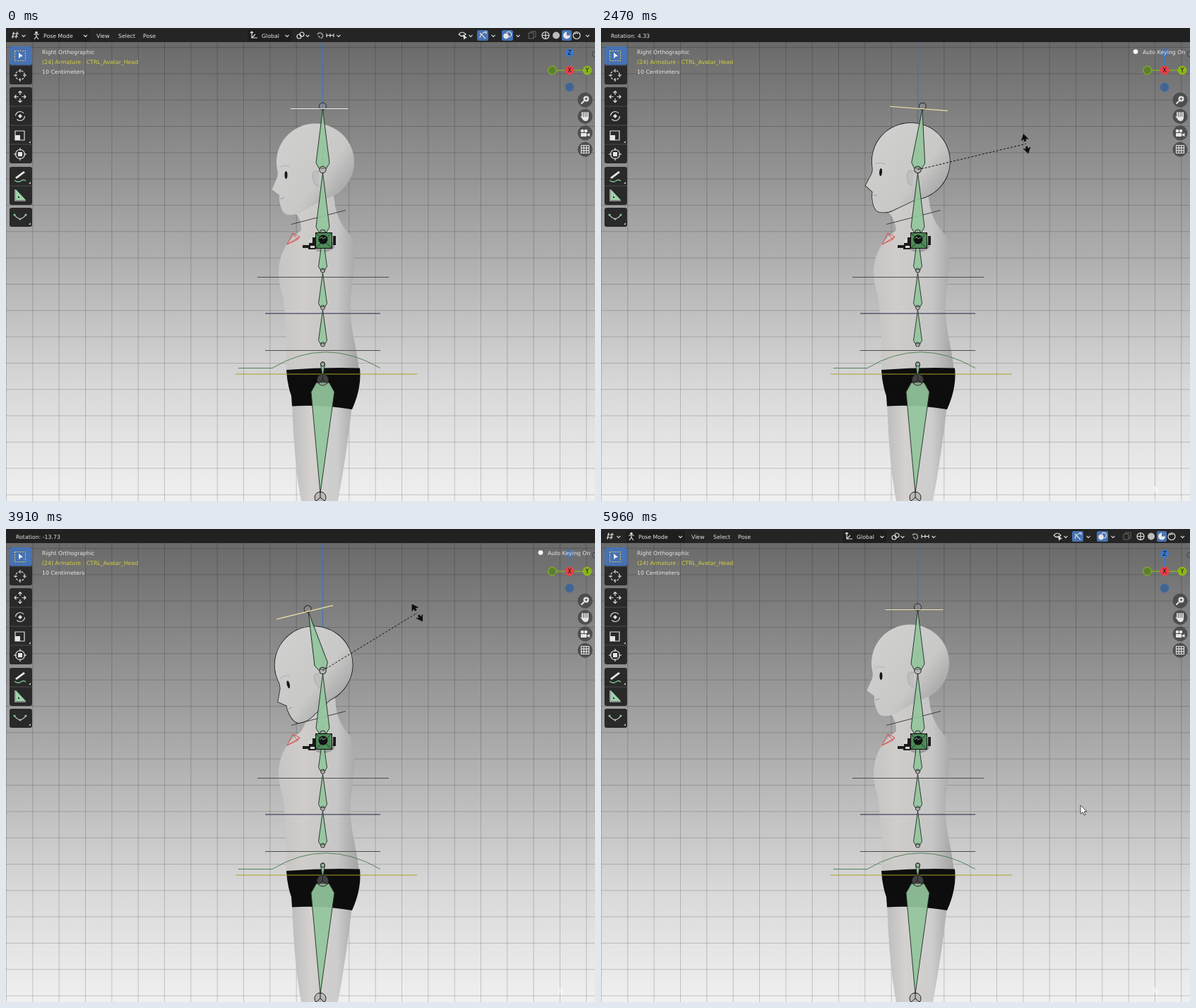
An HTML page that plays this animation: 834 px wide and 671 px high, repeating every 5.99 s.

```html
<!DOCTYPE html>
<html lang="en">
<head>
<meta charset="utf-8">
<title>Head bone rotation</title>
<style>
html, body { margin: 0; width: 100%; height: 100%; overflow: hidden; background: #999; }
svg { display: block; width: 834px; height: 671px; }
text { font: 7.8px "DejaVu Sans", Verdana, sans-serif; fill: #e6e6e6; white-space: pre; }
.axis { font-size: 8px; text-anchor: middle; fill: #111; }
.ico { fill: none; stroke: #dedede; stroke-width: 1.2; }
.lit { fill: #e6e6e6; }
.on { fill: #4772b3; }
.bone { fill: #93c69d; fill-opacity: .92; stroke: #1f2b22; stroke-width: .9; stroke-linejoin: round; }
.joint { fill: rgba(150,150,150,.4); stroke: #262626; stroke-width: 1; }
.line { fill: none; }
</style>
</head>
<body>
<svg viewBox="0 0 834 671">
<defs>
  <linearGradient id="sky" x1="0" y1="20" x2="0" y2="671" gradientUnits="userSpaceOnUse">
    <stop offset="0" stop-color="#6a6a6a"/><stop offset=".5" stop-color="#b3b3b3"/>
    <stop offset=".75" stop-color="#d8d8d8"/><stop offset="1" stop-color="#f0f0f0"/>
  </linearGradient>
  <linearGradient id="skin" x1="385" x2="497" y1="0" y2="0" gradientUnits="userSpaceOnUse">
    <stop offset="0" stop-color="#c6c5c4"/><stop offset=".3" stop-color="#cfccc9"/>
    <stop offset=".75" stop-color="#c6c6c6"/><stop offset="1" stop-color="#a6a6a6"/>
  </linearGradient>
  <linearGradient id="face" x1="395" y1="160" x2="492" y2="232" gradientUnits="userSpaceOnUse">
    <stop offset="0" stop-color="#cfcfce"/><stop offset=".6" stop-color="#c8c8c7"/>
    <stop offset="1" stop-color="#a0a0a0"/>
  </linearGradient>
  <linearGradient id="leg" x1="405" x2="490" y1="0" y2="0" gradientUnits="userSpaceOnUse">
    <stop offset="0" stop-color="#bdbdbd"/><stop offset=".3" stop-color="#d4d1cf"/>
    <stop offset=".75" stop-color="#cdcdcd"/><stop offset="1" stop-color="#aeaeae"/>
  </linearGradient>
  <path id="pointer" d="M0 0V12.3L3 9.6 5 14 7 13.1 5.1 8.8H9Z"/>
  <path id="chev" d="M-2.5-1.2 0 1.3 2.5-1.2" class="ico"/>
  <path id="tip" d="M0-14 5-6 1.2-7.500V-4H-1.2V-7.500L-5-6Z"/>
  <g id="skull">
    <ellipse cx="438" cy="190" rx="55" ry="54.500"/>
    <path d="M383 188Q386 206 384 212L376.500 229 387 237 387 244Q390 264 399 265 410 266 418 261L455 240Z"/>
  </g>
</defs>
<rect width="834" height="671" fill="url(#sky)"/>
<path id="grid" class="line" stroke="#000" stroke-opacity=".19"/>
<path d="M448.500 20V140" stroke="#3f74b8" stroke-width="1.200"/>

<path d="M405 530Q408 620 418 671H470Q483 600 490 535Z" fill="url(#leg)"/>
<path id="body" fill="url(#skin)"/>
<path d="M397 485Q450 481 501 482.500 504 510 490 541 447 534 405 536.500L404 522Q398 505 397 485Z" fill="#0d0d0d"/>
<path d="M432 309Q446 326 465 312V304H432Z" fill="#9d9d9d"/>

<g id="head">
  <use id="rim" href="#skull" stroke="#1b1b1b" stroke-width="1.500"/>
  <use href="#skull" fill="url(#face)"/>
  <path d="M443 204Q434 200 434 210 435 225 443 224" fill="#bebebe" stroke="#aaa"/>
  <path d="M387 198Q394 193 402 197" class="line" stroke="#b2b0ae"/>
  <ellipse cx="396.500" cy="208.500" rx="2" ry="5.500" fill="#181818"/>
  <path d="M388 242.500 394 241" stroke="#999"/>
</g>

<path d="M404 278.500 481 258.500" stroke="#333" stroke-width=".9"/>
<path d="M356 353.500H542M367 457.500H530" stroke="#4d4d4d"/>
<path d="M367 405H530" stroke="#25254f" stroke-width="1.100"/>
<path d="M329 482.500H377Q452 437 530 482.500" class="line" stroke="#437a4c" stroke-width=".9"/>
<path d="M325 491H582" stroke="#a7a32a" stroke-width="1.200"/>
<path d="M398 307 406 291 416 296 413 300ZL416 296M406 291 413 300" class="line" stroke="#d84a4a" stroke-width=".9"/>

<g id="bones"></g>
<path d="M420 308h9v-3h5v-8h4v17h-10v-2h-8ZM463 295h4v13h-4z" fill="#1b1b1b"/>
<path d="M428 300h5v5h-5zM431 309h6v3h-6z" fill="#d5d5d5"/>
<rect x="438.500" y="290.500" width="23" height="22" fill="#4e8a59" stroke="#111"/>
<path d="M439 291 461 312M461 291 439 312" stroke="#1d3b24"/>
<circle cx="449" cy="300" r="6.500" fill="#111"/>
<path d="M444 299l3-3 2 3 4-2" class="line" stroke="#79b487"/>
<path d="M448.500 171V196" stroke="#222" stroke-dasharray="2.500 2"/>
<g id="tipBone"></g>

<g id="drag">
  <path id="tether" stroke="#111" stroke-dasharray="3 2.200"/>
  <g id="arrows" fill="#0c0c0c" stroke="#0c0c0c" stroke-width=".6">
    <use href="#tip"/><use href="#tip" transform="rotate(180)"/>
  </g>
</g>

<g id="tools"></g>
<text x="51" y="36.500">Right Orthographic</text>
<text x="51" y="50.500" style="fill:#d6d03a">(24) Armature : CTRL_Avatar_Head</text>
<text x="51" y="64.500">10 Centimeters</text>

<path d="M779 60H817" stroke="#7fae1c" stroke-width="1.600"/>
<path d="M798 40V60" stroke="#3b78cc" stroke-width="1.600"/>
<circle cx="773.500" cy="60" r="5.800" fill="#5c7f33" stroke="#7fb01d" stroke-width="1.300"/>
<circle cx="798" cy="84" r="6" fill="#42658f" stroke="#3d6fb0"/>
<circle id="zBall" cx="798" cy="35" r="6" fill="#3b78cc"/>
<circle cx="798" cy="60" r="6.500" fill="#e8404a"/>
<circle cx="823" cy="60" r="6.500" fill="#8cb61c"/>
<text class="axis" x="798" y="63">X</text><text class="axis" x="823" y="63">Y</text>
<text class="axis" id="zText" x="798" y="38">Z</text>
<path d="M834 33a4 4 0 0 0 0 8" class="line" stroke="#444"/>
<g id="nav"></g>

<g id="menu">
  <rect width="834" height="20" fill="#252525"/>
  <rect x="35" y="2" width="84" height="17" rx="3" fill="#1e1e1e"/>
  <rect x="342" y="2" width="62" height="17" rx="3" fill="#1e1e1e"/>
  <rect x="667" y="3" width="16" height="15" rx="2.500" class="on"/>
  <rect x="702" y="3" width="16" height="15" rx="2.500" class="on"/>
  <rect x="787" y="3" width="14" height="15" rx="2" class="on"/>
  <text x="53" y="13.500">Pose Mode</text><text x="128" y="13.500">View</text>
  <text x="159" y="13.500">Select</text><text x="194" y="13.500">Pose</text>
  <text x="362" y="13.500">Global</text>
  <g id="chevs"></g>
  <path class="ico" d="M9 8h9M8 12h9M11 5.500l-2 9M16 5.500l-2 9"/>
  <path class="ico" d="M43 9v3l-3 4M43 12l3 4M39 9h8"/><circle cx="43" cy="6.500" r="1.800" class="lit"/>
  <path class="ico" d="M346 7l2-2 2 2M348 5v9h8M348 14l5-5"/>
  <circle class="ico" cx="415" cy="12" r="3"/><circle class="ico" cx="419" cy="9" r="3"/>
  <path d="M441 9a4 4 0 1 1 7 4l-2 2M442 11l3 3" class="line" stroke="#999" stroke-width="1.600"/>
  <path class="ico" d="M454 8v5M459 8v5M464 8v5M454 10.500h10"/>
  <path class="ico" d="M641 9q5-6 10 0-5 5-10 0"/><path d="M647 9l6 5-3 .5-1.500 2.500Z" class="lit"/>
  <path class="ico" d="M671 14q1-7 8-8M671 7l8 8M677 5.500h3v3"/>
  <circle cx="708" cy="11.500" r="3.700" class="lit"/><circle class="ico" cx="712" cy="9" r="3.700"/>
  <path d="M740 7h7v8h-7zM743 7v-2h7v8h-3" class="line" stroke="#666"/>
  <circle class="ico" cx="764" cy="10.500" r="5"/><path class="ico" d="M759 10.500h10M764 5.500v10"/>
  <circle cx="779" cy="10.500" r="5" fill="#bdbdbd"/>
  <circle cx="794" cy="10.500" r="5" class="lit"/><path d="M794 10.500V5.500a5 5 0 0 1 5 5Z" class="on"/>
  <circle class="ico" cx="808" cy="10.500" r="5"/><path class="ico" d="M805 9q2-3 5-1"/>
</g>
<g id="status">
  <rect width="834" height="20" fill="#212121"/>
  <text id="readout" x="14" y="13.500"></text>
  <circle cx="757" cy="33.500" r="3.300" fill="#fff"/>
  <text x="767" y="36.500">Auto Keying On</text>
</g>
<use id="residue" href="#pointer" x="782" y="648" fill="#fff" opacity=".45"/>
<circle id="click" cx="478.500" cy="114" r="9.500" fill="#d3c91c"/>
<use id="mouse" href="#pointer" fill="#fff" stroke="#222" stroke-width=".8"/>
</svg>
<script>
const LOOP = 5990, PX = 448.5, PY = 201, CELL = 37.33, RAD = Math.PI / 180;
const $ = id => document.getElementById(id);
const set = (id, name, value) => $(id).setAttribute(name, value);
const show = (id, on) => { $(id).style.display = on ? '' : 'none'; };

// Move a point part of the way along with the head
function follow(x, y, weight, deg) {
  const c = Math.cos(deg * RAD), s = Math.sin(deg * RAD), dx = x - PX, dy = y - PY;
  return [x + weight * (dx * c - dy * s - dx), y + weight * (dx * s + dy * c - dy)];
}

const torso = deg => `M${follow(432, 235, 1, deg)}L${follow(410, 263, 1, deg)}
  Q${follow(418, 270, .45, deg)} 418 287C385 310 380 345 392 380Q399 430 397 488H500
  C497 445 482 420 490 365C495 335 494 300 486 292Q467 272 ${follow(465, 244, .15, deg)}
  L${follow(462, 226, .6, deg)}Z`;

const joint = (y, r, x = PX) => `<circle class="joint" cx="${x}" cy="${y}" r="${r}"/>`;

// Kite from tip to base, widest just before the base
function bone(tip, base, half, tipX = PX) {
  const dir = Math.sign(base - tip), wide = base - dir * half * .8;
  return `<path class="bone" d="M${tipX} ${tip}L${PX + half} ${wide} ${PX + half * .55} ${base}
    H${PX - half * .55}L${PX - half} ${wide}Z"/>`;
}

function tools() {
  const groups = [[26, 2], [84, 4], [197, 2], [255, 1]];
  let out = '';
  for (const [y, n] of groups) {
    out += `<rect x="5" y="${y}" width="32" height="${n * 27}" rx="3" fill="#292929"/>`;
    for (let i = 1; i < n; i++) out += `<path d="M5 ${y + i * 27}H37" stroke="#555" stroke-width=".8"/>`;
  }
  const spokes = (y, from, to, head) => [0, 90, 180, 270].map(a =>
    `<path class="ico" transform="rotate(${a} 20 ${y})" d="M20 ${y - from}V${y - to}${head ? 'm-2.500 2.500l2.500-2.500 2.500 2.500' : ''}"/>`).join('');
  const ring = (y, dash = '') => `<circle class="ico" cx="20" cy="${y}" r="6.500" stroke-dasharray="${dash}"/>`;
  return out + `<rect x="5" y="26" width="32" height="26.500" rx="3" class="on"/>
    <rect x="12.500" y="32.500" width="15" height="14" class="line" stroke="#e6c766" stroke-dasharray="2 1.500"/>
    <path d="M18 35l6 5-3.500.5-2 3Z" fill="#fff"/>`
    + ring(67, '3 1.500') + spokes(67, 9, 4) + spokes(97.5, 2.5, 8, true)
    + ring(125, '15 5.400') + `<path d="M20 122l3 3-3 3-3-3z" class="lit"/>`
    + `<path class="ico" d="M13 146h13v13h-13z"/><path d="M13 152h7v7h-7z" class="lit"/>`
    + ring(179) + spokes(179, 9, 5) + `<path d="M17 176h6v6h-6z" class="lit"/>`
    + `<path d="M13 212l12-9 2 2-12 9z" class="lit"/><path d="M12 216q5 4 9 1t7 0" class="line" stroke="#7fc796" stroke-width="1.300"/>
    <path d="M14 229v15h14zM17 238v3h3z" fill="#9fd3ad" fill-rule="evenodd"/><path class="ico" d="M13 229v16h15"/>
    <path class="ico" d="M12 265q8 11 16 0"/><g fill="#8ccb9b"><circle cx="12" cy="265" r="1.500"/><circle cx="28" cy="265" r="1.500"/><circle cx="20" cy="271" r="1.500"/></g>`
    + [163, 221, 279].map(y => `<path d="M35 ${y - 3}v3h-3z" fill="#bbb"/>`).join('');
}

function nav() {
  let out = '';
  for (let i = 0; i < 4; i++) out += `<circle cx="820" cy="${102 + i * 23.4}" r="10.500" fill="#454545" fill-opacity=".85"/>`;
  for (let i = 0; i < 4; i++) out += `<path d="M${816 + i * 2.7} 127v-7" stroke="#e6e6e6" stroke-width="1.800" stroke-linecap="round"/>`;
  return out + `<circle cx="821.500" cy="100.500" r="4" class="lit"/><path d="M818.500 103.500l-4 4" stroke="#e6e6e6" stroke-width="2"/>
    <path d="M819.500 100.500h4M821.500 98.500v4" stroke="#444"/>
    <path d="M813 125l3 1h9q0 6-4.500 6-3 0-5-4z" class="lit"/>
    <path d="M814 149h8v5h-8zM822.500 151l4-2v5l-4-2z" class="lit"/><circle cx="816" cy="146" r="2.300" class="lit"/><circle cx="821" cy="146" r="2.300" class="lit"/>
    <path class="ico" d="M814.500 166.500h11v11h-11zM818.200 166.500v11M821.800 166.500v11M814.500 170.200h11M814.500 173.800h11"/>`;
}

function build() {
  let grid = '', spine = bone(205, 290, 9.5) + joint(290, 4);
  for (let x = PX - CELL * 12; x < 834; x += CELL) grid += `M${x} 20V671`;
  for (let y = 27.5; y < 671; y += CELL) grid += `M0 ${y}H834`;
  for (let y = 344; y < 460; y += 52.5) spine += bone(y - 49, y - 1, 6) + joint(y, 3);
  set('grid', 'd', grid);
  $('bones').innerHTML = spine + bone(497, 474, 3) + joint(477, 3) + bone(660, 503, 16.5, 445)
    + joint(499, 8) + joint(666, 8, 445)
    + `<path d="M448.500 491v8l-6 5M448.500 499l6 5M445 658v8l-6 5M445 666l6 5" class="line" stroke="#1c1c1c"/>`;
  $('tipBone').innerHTML = bone(115, 199, 9.5) + joint(111, 5) + joint(PY, 4.8)
    + `<path id="ctrl" d="M402.500 114.500H484.500" stroke-width="1.200"/>`;
  $('tools').innerHTML = tools();
  $('nav').innerHTML = nav();
  $('chevs').innerHTML = [25, 112.5, 398, 427, 471, 658, 690, 725, 823.5]
    .map(x => `<use href="#chev" x="${x}" y="11"/>`).join('');
}

// Each row is a time and its values; rows are joined by a cosine ease
const arrive = [[120, 782, 648], [690, 477, 100], [910, 478.5, 113.5], [1810, 478.5, 113.5], [2410, 589, 156]];
const leave = [[5530, 622, 190], [5930, 679, 392]];
const swing = [[2440, 0], [2470, 4.33], [3270, 43.7], [3910, -13.73], [4900, 48.77], [5400, 12]];

function sample(keys, t) {
  const i = keys.findIndex(k => k[0] > t);
  if (i < 1) return keys.at(i).slice(1);
  const a = keys[i - 1], b = keys[i];
  const u = (1 - Math.cos(Math.PI * (t - a[0]) / (b[0] - a[0]))) / 2;
  return a.slice(1).map((v, k) => v + (b[k + 1] - v) * u);
}

function drawDrag(deg) {
  const aim = deg - 17.8, dist = 157 + .021 * Math.max(0, deg) ** 2;
  const x = PX + dist * Math.cos(aim * RAD), y = PY + dist * Math.sin(aim * RAD);
  set('tether', 'd', `M${PX} ${PY}L${x} ${y}`);
  set('arrows', 'transform', `translate(${x} ${y}) rotate(${aim})`);
  $('readout').textContent = 'Rotation: ' + deg.toFixed(2);
}

function draw() {
  const t = performance.now() % LOOP;
  const turning = t >= 2440 && t < 5530;
  const deg = turning ? sample(swing, t)[0] : 0;
  const turn = a => `rotate(${a} ${PX} ${PY})`;
  set('head', 'transform', turn(deg));
  set('tipBone', 'transform', turn(deg));
  set('face', 'gradientTransform', turn(-deg)); // the light stays put
  set('body', 'd', torso(deg));
  set('ctrl', 'stroke', t < 1140 ? '#ecece8' : '#efe3a6');

  for (const id of ['rim', 'status', 'drag']) show(id, turning);
  for (const id of ['menu', 'zText']) show(id, !turning);
  set('zBall', 'opacity', turning ? .6 : 1);
  if (turning) drawDrag(deg);

  show('mouse', t >= 120 && !turning);
  set('mouse', 'transform', `translate(${sample(t < 2440 ? arrive : leave, t)})`);
  show('residue', t >= 150);
  show('click', t >= 1110 && t < 1640);
  set('click', 'opacity', .9 * Math.min(1, (1640 - t) / 300));
  requestAnimationFrame(draw);
}

build();
draw();
</script>
</body>
</html>
```
